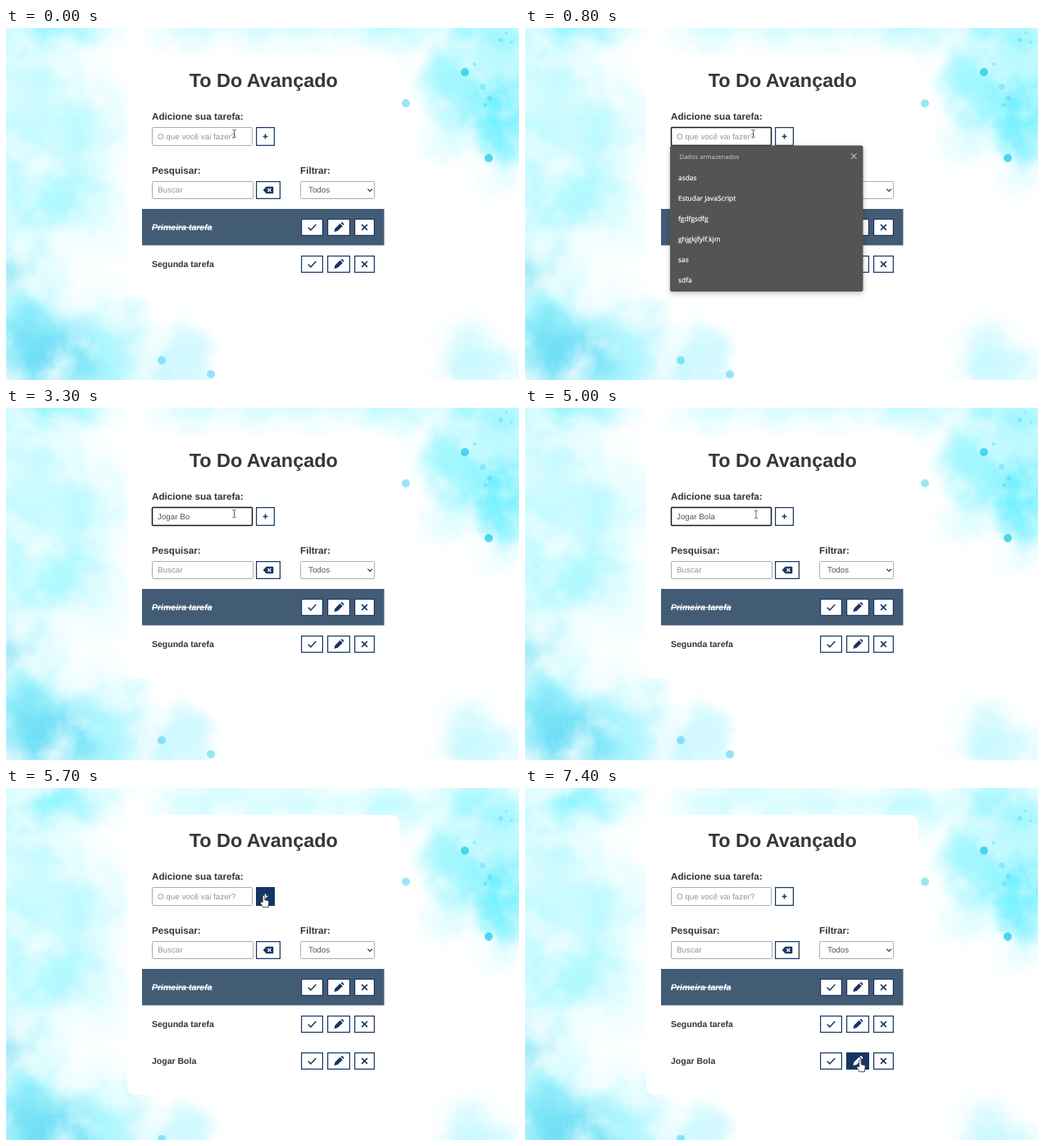
These frames come from a looping animation (626 by 430 pixels, 8000 ms). An HTML page:

```html
<!DOCTYPE html>
<html lang="pt-BR">
<head>
<meta charset="utf-8">
<title>To Do Avançado</title>
<style>
  html, body { margin: 0; width: 100%; height: 100%; overflow: hidden; background: #fff; }
  svg { display: block; width: 626px; height: 430px; }
  text { font-family: "Liberation Sans", Arial, sans-serif; text-rendering: geometricPrecision; }
  .title { font-size: 23.4px; font-weight: bold; fill: #33363a; text-anchor: middle; }
  .label { font-size: 11.7px; font-weight: bold; fill: #33363a; }
  .task { font-size: 10.5px; font-weight: bold; fill: #33363a; }
  .done .task { fill: #fff; font-style: italic; text-decoration: line-through; }
  .field { fill: #fff; stroke: #adadad; }
  .field.focus { stroke: #1a1a1a; stroke-width: 1.5; }
  .value { font-size: 9.8px; fill: #555; }
  .hint { font-size: 9.8px; fill: #959595; }
  .btn { color: #173563; }
  .btn rect { fill: #fff; stroke: #173563; stroke-width: 1.2; }
  .btn.hot { color: #fff; }
  .btn.hot rect { fill: #173563; }
  .line { fill: none; stroke: currentColor; stroke-width: 1.5; }
  .solid { fill: currentColor; }
  #popup { filter: drop-shadow(0 2px 3px #0004); }
  #popup text { font-family: "Open Sans", "Noto Sans", sans-serif; font-size: 8.4px; fill: #fff; stroke: #fff; stroke-width: .2; }
  #popup .head { font-size: 7.6px; fill: #d0d0d0; stroke: none; }
</style>
</head>
<body>
<svg viewBox="0 0 626 430">
  <defs>
    <filter id="wash" filterUnits="userSpaceOnUse" x="-60" y="-80" width="750" height="600" color-interpolation-filters="sRGB">
      <feTurbulence type="fractalNoise" baseFrequency=".02" numOctaves="5" seed="7" result="noise"/>
      <feGaussianBlur in="SourceGraphic" stdDeviation="9" result="soft"/>
      <feDisplacementMap in="soft" in2="noise" scale="45" xChannelSelector="R" yChannelSelector="G" result="paint"/>
      <feColorMatrix in="noise" values="0 0 0 0 1  0 0 0 0 1  0 0 0 0 1  0 0 1.6 0 -.7" result="mist"/>
      <feMerge><feMergeNode in="paint"/><feMergeNode in="mist"/></feMerge>
    </filter>
  </defs>

  <rect width="626" height="430" fill="#fff"/>
  <g id="back"><g id="paint" filter="url(#wash)"></g><g id="drops"></g></g>

  <rect id="card" x="148" y="33" width="332" height="297" rx="11" fill="#fff"/>
  <text class="title" x="314.2" y="72">To Do Avançado</text>
  <text class="label" x="178" y="111.7">Adicione sua tarefa:</text>
  <text class="label" x="178" y="178.2">Pesquisar:</text>
  <text class="label" x="359" y="178.2">Filtrar:</text>

  <rect id="entry" class="field" x="178.5" y="121.5" width="122" height="22" rx="1"/>
  <text id="hint" class="hint" x="185" y="135.5">O que você vai fazer?</text>
  <text id="typed" class="value" x="185" y="135.5"></text>
  <path id="caret" d="M0 127.5v10" stroke="#222" stroke-width=".9"/>
  <rect class="field" x="178.5" y="187.500" width="123" height="21" rx="1"/>
  <text class="hint" x="185" y="201.2">Buscar</text>
  <rect class="field" x="359.5" y="187.5" width="90" height="21" rx="1"/>
  <text class="value" x="369" y="201.4">Todos</text>
  <path d="M441.4 196.6l2.8 2.8 2.8-2.8" fill="none" stroke="#333" stroke-width="1.3"/>

  <g id="rows"></g>
  <g id="tools"></g>

  <g id="popup">
    <rect x="177" y="143.5" width="235.5" height="178.5" rx="2.5" fill="#545454"/>
    <text class="head" x="188.6" y="159.5">Dados armazenados</text>
    <path d="M398 153.3l6.6 6.6m0-6.6l-6.6 6.6" stroke="#eee"/>
  </g>

  <g id="cursor">
    <path id="beam" d="M-2.2-4.5h1.6l.6.5.6-.5h1.6M0-4v8.2M-2.2 4.7h1.6l.6-.5.6.5h1.6" fill="none" stroke="#555" stroke-width=".9"/>
    <path id="arrow" d="M0 0V12.5L2.9 9.8 4.8 14 6.7 13.2 4.9 9.1H8.8Z" fill="#fff" stroke="#111" stroke-width=".8"/>
    <path id="hand" d="M-1.3 8V1a1.3 1.3 0 0 1 2.6 0V5.2L5 6Q6.3 6.4 6.2 8L5.4 14.2H-1L-4 9.3Q-4.5 7.6-3 7.5Z" fill="#fff" stroke="#222" stroke-width=".8" stroke-linejoin="round"/>
  </g>
</svg>

<script>
const LOOP = 8000, ADDED = 5600, ROW = 45;
const $ = id => document.getElementById(id);
const show = (id, on) => { $(id).style.display = on ? 'inline' : 'none'; };

let seed = 11;
const random = () => (seed = seed * 16807 % 2147483647) / 2147483647;
const repeat = (n, make) => Array.from({ length: n }, make).join('');
const circle = (x, y, r, color, alpha) =>
  `<circle cx="${x}" cy="${y}" r="${r}" fill="${color}" opacity="${alpha}"/>`;

// n translucent blots spread over a box; their overlap builds up the tone.
const splash = (n, [x, y, w, h], r, color, alpha) => repeat(n, () =>
  circle(x + w * random(), y + h * random(), r * (.7 + .6 * random()), color, alpha));

const CYAN = '#4deaff', BLUE = '#46c3e6';
$('paint').innerHTML =
  splash(46, [-20, -20, 135, 460], 45, CYAN, .07) +
  splash(12, [10, -15, 110, 35], 24, CYAN, .12) +
  splash(28, [200, -20, 320, 32], 26, CYAN, .07) +
  splash(16, [20, 360, 200, 70], 36, CYAN, .09) +
  splash(26, [525, -15, 105, 185], 32, CYAN, .13) +
  splash(9, [590, 70, 35, 80], 22, CYAN, .2) +
  splash(10, [540, 380, 90, 50], 34, CYAN, .05) +
  splash(16, [5, 350, 95, 75], 26, BLUE, .11) +
  splash(7, [-10, 265, 40, 60], 22, BLUE, .09);

const drops = [[560, 54], [488, 92], [589, 159], [190, 406], [250, 423]];
$('drops').innerHTML =
  drops.map(([x, y]) => circle(x, y, 5, '#22c8e8', x > 500 ? .75 : .45)).join('') +
  repeat(7, () => circle(540 + 85 * random(), 100 * random(), 1 + 3 * random(), '#22c8e8', .3));

const icons = {
  plus: '<path class="line" d="M-2.9 0h5.800M0-2.9v5.800"/>',
  check: '<path class="line" d="M-4.8.2L-1.6 3.4 4.8-3.4"/>',
  cross: '<path class="line" d="M-3.4-3.4l6.8 6.8m0-6.8l-6.8 6.8"/>',
  pen: '<path class="solid" d="M-5.6 5.6L-4.6 1.4 1.6-4.8 4.8-1.6-1.4 4.6Z' +
       'M2.4-5.5l.7-.6q.8-.6 1.6.2l1.2 1.2q.8.8.2 1.6l-.6.7Z"/>',
  erase: '<path class="solid" d="M-6.3 0L-2.3-4.3H5.3q1 0 1 1V3.3q0 1-1 1H-2.3Z"/>' +
         '<path d="M-.6-2l4 4m0-4l-4 4" stroke="#fff" stroke-width="1.3"/>'
};
const buttons = [];
function button(icon, x, y, w, h) {
  buttons.push({ id: `btn${buttons.length}`, box: [x, y, w, h] });
  return `<g class="btn" id="${buttons.at(-1).id}">` +
    `<rect x="${x + .6}" y="${y + .6}" width="${w - 1.2}" height="${h - 1.2}"/>` +
    `<g transform="translate(${x + w / 2} ${y + h / 2})">${icons[icon]}</g></g>`;
}

$('tools').innerHTML = button('plus', 305, 121, 23, 23) + button('erase', 305, 187, 30, 22);
$('rows').innerHTML = ['Primeira tarefa', 'Segunda tarefa', 'Jogar Bola'].map((name, i) => {
  const y = 221 + i * ROW;
  return `<g id="row${i}" class="${i ? '' : 'done'}">` +
    (i ? '' : `<rect x="166" y="${y}" width="295.5" height="44.5" fill="#435c76"/>`) +
    `<text class="task" x="178" y="${y + 25.8}">${name}</text>` +
    button('check', 360, y + 12, 27, 21) + button('pen', 392, y + 12, 28, 21) +
    button('cross', 425, y + 12, 25, 21) + '</g>';
}).join('');
$('popup').innerHTML += ['asdas', 'Estudar JavaScript', 'fgdfgsdfg', 'ghjgkjfylf.kjm', 'sas', 'sdfa']
  .map((s, i) => `<text x="187" y="${185.5 + i * 25}">${s}</text>`).join('');

// Letters of the new task present from each time on
const TASK = 'Jogar Bola';
const typing = [[0, 0], [1900, 2], [2400, 5], [2700, 7], [2900, 8], [4300, 10], [ADDED, 0]];

// Pointer glides: from, until, where to
const glides = [
  [4900, 5000, 282, 130], [5300, 5500, 314.5, 131.5], [6200, 6900, 409, 329],
  [7100, 7200, 417, 313], [7200, 7400, 409, 332.5]
];
const ease = k => k * k * (3 - 2 * k);
function pointer(t) {
  let x = 278.5, y = 129;
  for (const [from, until, toX, toY] of glides) {
    const k = ease(Math.min(1, Math.max(0, (t - from) / (until - from))));
    x += (toX - x) * k;
    y += (toY - y) * k;
  }
  return [x, y];
}

const inside = (x, y, [l, t, w, h]) => x >= l && x <= l + w && y >= t && y <= t + h;
const between = (t, a, b) => t >= a && t < b;

function draw(t) {
  const added = t >= ADDED;
  $('back').setAttribute('transform', `translate(0 ${added ? ROW / 2 : 0})`);
  $('card').setAttribute('height', 297 + (added ? ROW : 0));
  show('row2', added);

  const count = typing.findLast(([at]) => at <= t)[1];
  $('typed').textContent = TASK.slice(0, count);
  show('hint', !count);
  $('entry').classList.toggle('focus', between(t, 700, ADDED));
  show('caret', between(t, 1900, 3200) || between(t, 4300, 5000));
  $('caret').setAttribute('transform', `translate(${185.6 + $('typed').getComputedTextLength()} 0)`);
  show('popup', between(t, 700, 1900));
  $('popup').setAttribute('opacity', t < 800 ? .6 : 1);

  const [x, y] = pointer(t);
  const hot = buttons.find(b => inside(x, y, b.box));
  const entry = inside(x, y, [178, 121, 123, 23]);
  for (const b of buttons) $(b.id).classList.toggle('hot', b === hot);
  show('beam', entry);
  show('hand', hot);
  show('arrow', !entry && !hot);
  $('cursor').setAttribute('transform', `translate(${x} ${y})`);
}

const start = performance.now();
let last = -1;
function tick() {
  const t = Math.floor((performance.now() - start) % LOOP / 100) * 100;
  if (t !== last) draw(last = t);
  requestAnimationFrame(tick);
}
tick();
</script>
</body>
</html>
```
